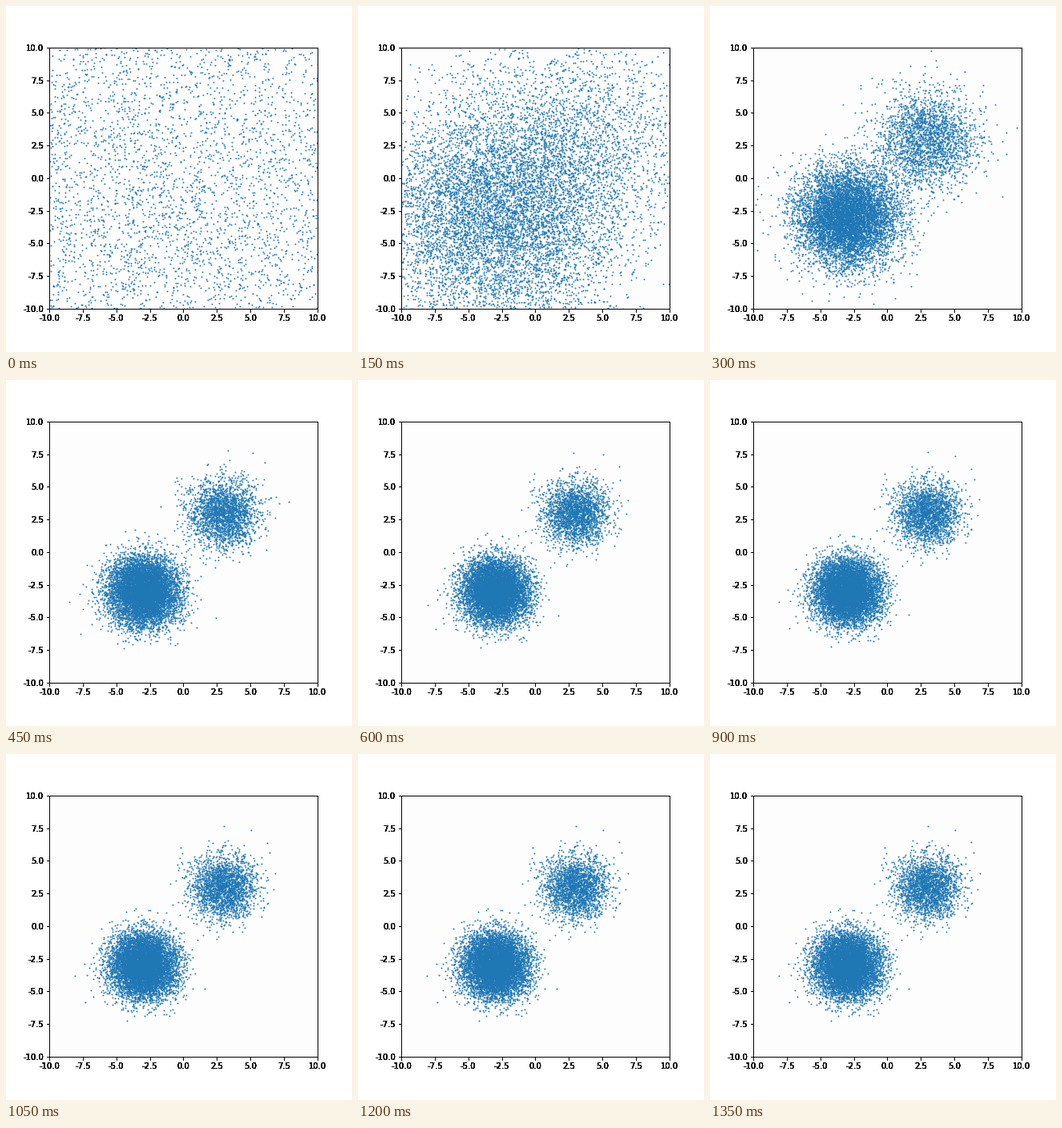
A matplotlib script that plays this animation: 432x432 px, repeating every 1500 ms.

```python
import numpy as np
import matplotlib.pyplot as plt
from matplotlib.animation import FuncAnimation

plt.rcParams.update({
    "font.family": "DejaVu Sans",
    "font.size": 10,
    "axes.unicode_minus": False,
})

STEPS = 10
N_LOW, N_HIGH = 7700, 2300
LIMIT = 10
CENTER = 3
SPREAD = 1.21               # width of a settled cluster
NOISE, DECAY = 13, 0.33     # first noise level and its factor per step


def anneal(seed=7):
    """Poses of all dots while the noise level falls step by step."""
    rng = np.random.default_rng(seed)
    means = np.repeat([[-CENTER], [CENTER]], [N_LOW, N_HIGH], axis=0)
    z = rng.standard_normal((N_LOW + N_HIGH, 2))
    path = []
    for step in range(STEPS):
        level = NOISE * DECAY ** step
        fresh = min(1, 1.5 * level)
        z = np.sqrt(1 - fresh ** 2) * z + fresh * rng.standard_normal(z.shape)
        path.append(means + np.hypot(SPREAD, level) * z)
    return path


def add_axes():
    ax = fig.add_axes([0.125, 0.125, 0.775, 0.755])
    ticks = np.linspace(-LIMIT, LIMIT, 9)
    ax.set(xlim=(-LIMIT, LIMIT), ylim=(-LIMIT, LIMIT),
           xticks=ticks, yticks=ticks)
    return ax


path = anneal()
fig = plt.figure(figsize=(6, 6), dpi=72, facecolor="white")

ax = add_axes()
ax.set_facecolor("#fdfdfd")
dots, = ax.plot([], [], "o", color="#1f77b4", ms=1, mew=0.9)

# Stacked copies of the frame give the heavy tick labels
for _ in range(7):
    add_axes().patch.set_visible(False)


def update(i):
    dots.set_data(*path[i].T)
    return dots,


anim = FuncAnimation(fig, update, frames=STEPS, interval=150, repeat=True)
plt.show()
```
